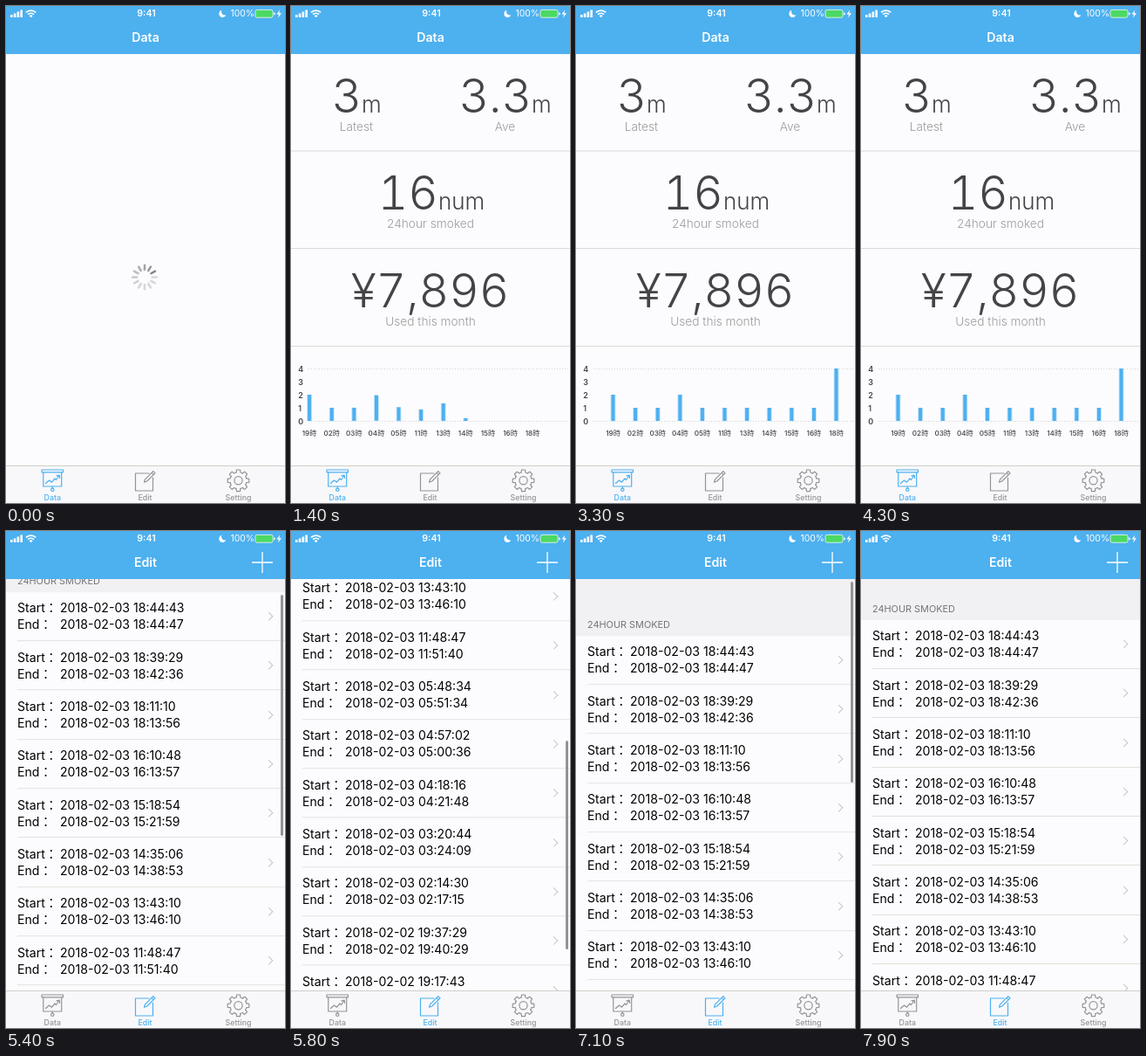
Animation of 320 by 569 pixels, one loop 8 s. Source, as an HTML page without scripts:

```html
<!DOCTYPE html>
<html lang="en">
<head>
<meta charset="utf-8">
<title>Smoking log</title>
<style>
:root { --blue: #4db0ef; --gray: #949494; --ink: #444448; }
html, body { margin: 0; width: 100%; height: 100%; overflow: hidden; background: #fcfcff; }
#stage { position: relative; width: 320px; height: 569px; overflow: hidden; font-family: Inter, "Noto Sans CJK JP", "Noto Sans CJK", sans-serif; }
svg { position: absolute; left: 0; top: 0; }

/* screens */
.load, .data, .dataTitle, .edit { animation: load 8s step-end infinite; }
.data { animation-name: data; }
.dataTitle { animation-name: dataTitle; }
.edit { animation-name: edit; }
@keyframes load { 0% { visibility: visible } 7.5%, 100% { visibility: hidden } }
@keyframes data { 0% { visibility: hidden } 7.5% { visibility: visible } 55%, 100% { visibility: hidden } }
@keyframes dataTitle { 0% { visibility: visible } 55%, 100% { visibility: hidden } }
@keyframes edit { 0% { visibility: hidden } 55%, 100% { visibility: visible } }

/* spinner */
.spin { animation: spin 1s steps(12) infinite; }
@keyframes spin { from { transform: rotate(60deg) } to { transform: rotate(420deg) } }

/* figures: text-size letterforms and even digits, also when large */
.big { font-size: 53.5px; font-weight: 350; font-variation-settings: "opsz" 14; font-variant-numeric: tabular-nums; fill: var(--ink); text-anchor: middle; }
.big tspan { font-size: 26px; }
.cap { font-size: 13.7px; font-weight: 300; fill: #9c9c9c; text-anchor: middle; }

/* chart */
.axis { font-size: 9px; font-weight: 600; fill: var(--ink); }
.hours { font-size: 8.2px; font-weight: 500; fill: var(--ink); text-anchor: middle; animation: slide 8s infinite; }
.hours rect { x: -2.3px; width: 4.6px; fill: var(--blue); animation: grow 8s ease-in-out calc(689ms + var(--i) * 100ms) infinite backwards; }
@keyframes slide { 0%, 31% { transform: translateX(-21.4px) } 36%, 100% { transform: none } }
@keyframes grow {
  0% { transform: scaleY(0); animation-timing-function: cubic-bezier(.3, .3, .6, 1) }
  1.18% { transform: scaleY(1.37) }
  2.5% { transform: scaleY(.868) }
  3.8% { transform: scaleY(1.049) }
  5.1% { transform: scaleY(.98) }
  6.4% { transform: scaleY(1.006) }
  8.75%, 60% { transform: scaleY(1) }
  60.01%, 100% { transform: scaleY(0) }
}

/* list */
#list { position: absolute; inset: 55px 0 42px; overflow: hidden; background: #f1f1f4; }
.scroll { animation: scroll 8s linear infinite; }
h2 { box-sizing: border-box; height: 46.7px; margin: 0; padding: 25px 0 0 13px; font: 400 10.9px/19px Inter, sans-serif; color: #747478; }
ul { margin: 0; padding: 0; list-style: none; }
li { position: relative; box-sizing: border-box; height: 56.33px; padding: 8.6px 0 0 13px; font-size: 14.1px; line-height: 19px; color: #000; background: #fcfcff; white-space: nowrap; }
li i { display: inline-block; width: 49px; font-style: normal; }
li::before { content: ""; position: absolute; left: 13px; right: 0; bottom: 0; height: 1px; background: #dfdfdb; }
li::after { content: ""; position: absolute; left: 297.5px; top: 24.3px; width: 6px; height: 6px; border: solid #c6c6c8; border-width: 1.5px 1.5px 0 0; transform: rotate(45deg); }
@keyframes scroll {
  0%, 65.25% { transform: none; animation-timing-function: ease-in }
  67.5% { transform: translateY(-31px) }
  68.75% { transform: translateY(-108px) }
  70% { transform: translateY(-203px) }
  72.5% { transform: translateY(-392px) }
  74.4% { transform: translateY(-480px); animation-timing-function: ease-out }
  76.5% { transform: translateY(-508px); animation-timing-function: ease-in-out }
  80.6% { transform: translateY(-478px); animation-timing-function: ease-in }
  82.5% { transform: translateY(-395.5px) }
  88.1% { transform: none; animation-timing-function: ease-out }
  90% { transform: translateY(36px); animation-timing-function: ease-in-out }
  95.6%, 100% { transform: none }
}
.thumb { position: absolute; left: 315px; width: 2.5px; border-radius: 2px; background: #929294; animation: thumb 8s linear infinite, fade 8s linear infinite; }
@keyframes thumb {
  0%, 65.25% { top: 3px; height: 278px }
  67.5% { top: 18px; height: 276px }
  72.5% { top: 185px; height: 239px }
  74.4% { top: 231px; height: 236px }
  76.5% { top: 253px; height: 214px }
  80.6% { top: 231px; height: 236px }
  82.5% { top: 187px; height: 239px }
  88.1% { top: 3px; height: 240px }
  90% { top: 3px; height: 210px }
  95.6%, 100% { top: 3px; height: 240px }
}
@keyframes fade { 0%, 65.25% { opacity: 0 } 66.2%, 95.6% { opacity: 1 } 98%, 100% { opacity: 0 } }

/* bars */
.title { font-size: 14.2px; font-weight: 600; fill: #fff; text-anchor: middle; }
.status { font-size: 10.6px; fill: #fff; }
.tab { color: var(--gray); fill: none; stroke: currentColor; stroke-width: 1.2; stroke-linejoin: round; stroke-linecap: round; }
.tab text { font-size: 8.8px; font-weight: 500; fill: currentColor; stroke: none; text-anchor: middle; }
.first { animation: first 8s step-end infinite; }
.second { animation: second 8s step-end infinite; }
@keyframes first { 0% { color: var(--blue) } 55%, 100% { color: var(--gray) } }
@keyframes second { 0% { color: var(--gray) } 55%, 100% { color: var(--blue) } }
</style>
</head>
<body>
<div id="stage">

<svg class="load" width="320" height="569">
  <defs><path id="spoke" d="M0-8.6V-13.8" stroke="#7c7c7e" stroke-width="2.3" stroke-linecap="round"/></defs>
  <g transform="translate(159 310.5)"><g class="spin">
    <use href="#spoke"/>
    <use href="#spoke" transform="rotate(-30)" opacity=".88"/>
    <use href="#spoke" transform="rotate(-60)" opacity=".77"/>
    <use href="#spoke" transform="rotate(-90)" opacity=".66"/>
    <use href="#spoke" transform="rotate(-120)" opacity=".56"/>
    <use href="#spoke" transform="rotate(-150)" opacity=".46"/>
    <use href="#spoke" transform="rotate(180)" opacity=".38"/>
    <use href="#spoke" transform="rotate(150)" opacity=".34"/>
    <use href="#spoke" transform="rotate(120)" opacity=".32"/>
    <use href="#spoke" transform="rotate(90)" opacity=".32"/>
    <use href="#spoke" transform="rotate(60)" opacity=".32"/>
    <use href="#spoke" transform="rotate(30)" opacity=".32"/>
  </g></g>
</svg>

<svg class="data" width="320" height="569">
  <text class="big" x="75" y="121.5">3<tspan>m</tspan></text>
  <text class="cap" x="75" y="142.5">Latest</text>
  <text class="big" x="245.5" y="121.5">3.3<tspan>m</tspan></text>
  <text class="cap" x="245.5" y="142.5">Ave</text>
  <text class="big" x="161" y="232.7">16<tspan>num</tspan></text>
  <text class="cap" x="160" y="254.3">24hour smoked</text>
  <text class="big" x="159.5" y="344.5">¥7,896</text>
  <text class="cap" x="160" y="366">Used this month</text>
  <path d="M0 166H320M0 277.5H320M0 389.5H320" stroke="#d9d9d6"/>

  <path d="M20 415.5H320M20 475.5H320" stroke="#d4d4d6" stroke-dasharray="1 2"/>
  <g class="axis">
    <text x="8.3" y="419">4</text><text x="8.3" y="434">3</text><text x="8.3" y="449">2</text>
    <text x="8.3" y="464">1</text><text x="8.3" y="479">0</text>
  </g>
  <g class="hours">
    <g transform="translate(42.5 475)" style="--i:0"><rect y="-30" height="30"/><text y="17">19時</text></g>
    <g transform="translate(68.1 475)" style="--i:1"><rect y="-15" height="15"/><text y="17">02時</text></g>
    <g transform="translate(93.7 475)" style="--i:2"><rect y="-15" height="15"/><text y="17">03時</text></g>
    <g transform="translate(119.3 475)" style="--i:3"><rect y="-30" height="30"/><text y="17">04時</text></g>
    <g transform="translate(144.9 475)" style="--i:4"><rect y="-15" height="15"/><text y="17">05時</text></g>
    <g transform="translate(170.5 475)" style="--i:5"><rect y="-15" height="15"/><text y="17">11時</text></g>
    <g transform="translate(196.1 475)" style="--i:6"><rect y="-15" height="15"/><text y="17">13時</text></g>
    <g transform="translate(221.7 475)" style="--i:7"><rect y="-15" height="15"/><text y="17">14時</text></g>
    <g transform="translate(247.3 475)" style="--i:8"><rect y="-15" height="15"/><text y="17">15時</text></g>
    <g transform="translate(272.9 475)" style="--i:9"><rect y="-15" height="15"/><text y="17">16時</text></g>
    <g transform="translate(298.5 475)" style="--i:10"><rect y="-60" height="60"/><text y="17">18時</text></g>
  </g>
</svg>

<div id="list" class="edit">
  <div class="scroll">
    <h2>24HOUR SMOKED</h2>
    <ul>
      <li><i>Start：</i>2018-02-03 18:44:43<br><i>End：</i>2018-02-03 18:44:47</li>
      <li><i>Start：</i>2018-02-03 18:39:29<br><i>End：</i>2018-02-03 18:42:36</li>
      <li><i>Start：</i>2018-02-03 18:11:10<br><i>End：</i>2018-02-03 18:13:56</li>
      <li><i>Start：</i>2018-02-03 16:10:48<br><i>End：</i>2018-02-03 16:13:57</li>
      <li><i>Start：</i>2018-02-03 15:18:54<br><i>End：</i>2018-02-03 15:21:59</li>
      <li><i>Start：</i>2018-02-03 14:35:06<br><i>End：</i>2018-02-03 14:38:53</li>
      <li><i>Start：</i>2018-02-03 13:43:10<br><i>End：</i>2018-02-03 13:46:10</li>
      <li><i>Start：</i>2018-02-03 11:48:47<br><i>End：</i>2018-02-03 11:51:40</li>
      <li><i>Start：</i>2018-02-03 05:48:34<br><i>End：</i>2018-02-03 05:51:34</li>
      <li><i>Start：</i>2018-02-03 04:57:02<br><i>End：</i>2018-02-03 05:00:36</li>
      <li><i>Start：</i>2018-02-03 04:18:16<br><i>End：</i>2018-02-03 04:21:48</li>
      <li><i>Start：</i>2018-02-03 03:20:44<br><i>End：</i>2018-02-03 03:24:09</li>
      <li><i>Start：</i>2018-02-03 02:14:30<br><i>End：</i>2018-02-03 02:17:15</li>
      <li><i>Start：</i>2018-02-02 19:37:29<br><i>End：</i>2018-02-02 19:40:29</li>
      <li><i>Start：</i>2018-02-02 19:17:43<br><i>End：</i>2018-02-02 19:21:21</li>
      <li><i>Start：</i>2018-02-02 19:01:36<br><i>End：</i>2018-02-02 19:04:52</li>
    </ul>
  </div>
  <div class="thumb"></div>
</div>

<svg width="320" height="569">
  <rect width="320" height="55" fill="var(--blue)"/>
  <g class="status">
    <path d="M5 10h2.6v3H5zM8.8 8.4h2.6V13H8.8zM12.6 6.6h2.6V13h-2.6zM16.4 4.6H19V13h-2.6z"/>
    <g fill="none" stroke="#fff" stroke-width="1.7">
      <path d="M23 7.4a8 8 0 0 1 11.2 0M25.1 9.7a5 5 0 0 1 7 0"/>
    </g>
    <path d="M28.6 13.2l-2-2a2.8 2.8 0 0 1 4 0z"/>
    <text x="161" y="12.4" font-weight="600" text-anchor="middle">9:41</text>
    <path d="M247.2 4.8a4.2 4.2 0 1 0 5.2 5.5 4.2 4.2 0 0 1-5.2-5.5z"/>
    <text x="257.5" y="12.4" font-size="10.4">100%</text>
    <rect x="286" y="4.4" width="20" height="8.8" rx="1.8" fill="#4cd964" stroke="#e4f4ee" stroke-width=".9"/>
    <path d="M307.2 7.2a1.6 1.6 0 0 1 0 3.2zM314.2 4.4l-3.8 5h2.6l-1 4 4-5.2h-2.7z"/>
  </g>
  <text class="title dataTitle" x="160" y="41">Data</text>
  <g class="edit">
    <text class="title" x="160" y="41">Edit</text>
    <path d="M282 36H306M294 24V48" stroke="#fff" stroke-width="1.3"/>
  </g>

  <rect y="526.5" width="320" height="43" fill="#f8f8fb"/>
  <path d="M0 526.5H320" stroke="#cfcfca"/>
  <g class="tab first">
    <path d="M41 531H65.5V533.8H41zM42.8 533.8V550H63.7V533.8M45.5 546.5L49.5 543 52.5 545.2 56 541 57.5 542.5 61 537.5M58 537.8L61.2 537.2 61.6 540.4M53.3 550V552"/>
    <circle cx="53.3" cy="553.8" r="1.7"/>
    <text x="53.3" y="565.7">Data</text>
  </g>
  <g class="tab second">
    <path d="M164 535H148.5V555H168.5V540M158.5 545.2L159.6 541.8 168.8 532.6 171 534.8 161.8 544zM167 534.4L169.2 536.6"/>
    <text x="159.5" y="565.7">Edit</text>
  </g>
  <g class="tab">
    <defs><path id="tooth" d="M-2.4-9.3L-2-12.3H2L2.4-9.3A9.6 9.6 0 0 1 4.9-8.2"/></defs>
    <g transform="translate(266.5 543.3)">
      <circle r="4.6"/>
      <use href="#tooth"/>
      <use href="#tooth" transform="rotate(45)"/>
      <use href="#tooth" transform="rotate(90)"/>
      <use href="#tooth" transform="rotate(135)"/>
      <use href="#tooth" transform="rotate(180)"/>
      <use href="#tooth" transform="rotate(225)"/>
      <use href="#tooth" transform="rotate(270)"/>
      <use href="#tooth" transform="rotate(315)"/>
    </g>
    <text x="266.5" y="565.7">Setting</text>
  </g>
</svg>

</div>
</body>
</html>
```
